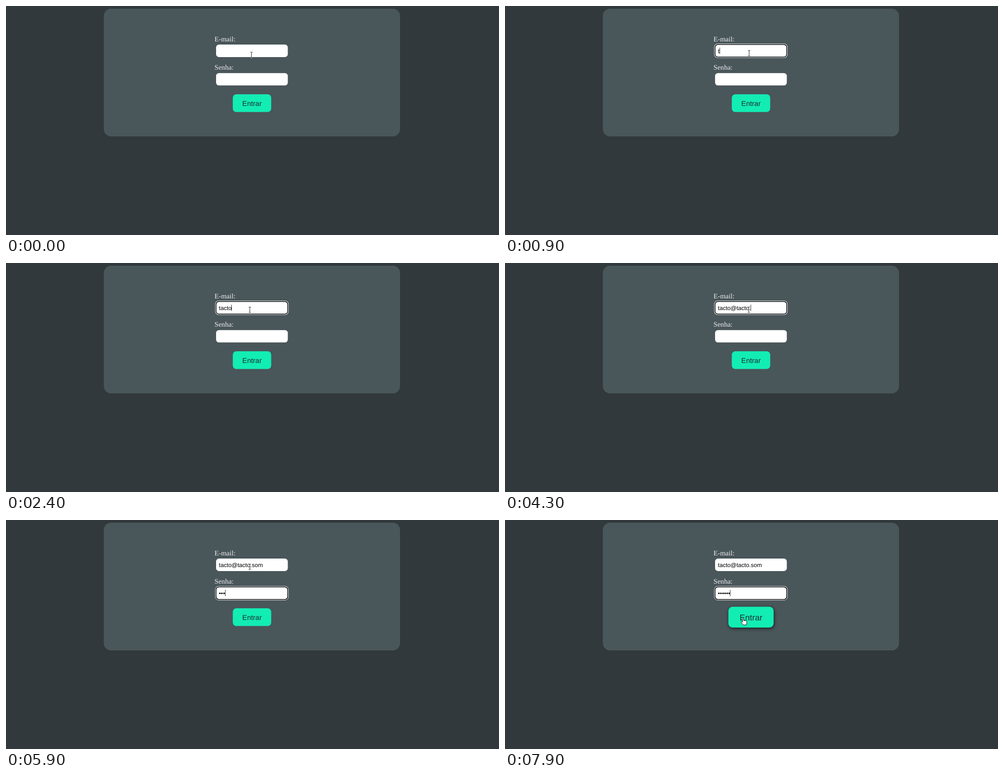
Animation, 1096 px wide and 511 px high, one loop 8000 ms. Source, as an HTML page:

```html
<!DOCTYPE html>
<html lang="pt">
<head>
<meta charset="utf-8">
<title>Login</title>
<style>
  html, body { margin: 0; width: 100%; height: 100%; overflow: hidden; background: #31393c; }
  svg { display: block; }
  text { white-space: pre; text-rendering: geometricPrecision; }
  .label { font: 15.6px "Liberation Serif", serif; fill: #eee; }
  .value { font: 13px "Liberation Sans", sans-serif; fill: #000; }
  .action { font: 15.8px "Liberation Sans", sans-serif; fill: #1d2d30; text-anchor: middle; }
  #menu text { font: 600 12.8px "Open Sans", sans-serif; fill: #1c1c1e; }
  .field { fill: #fff; }
</style>
</head>
<body>
<svg width="1096" height="511" viewBox="0 0 1096 511">
  <rect x="217.5" y="6" width="658.5" height="285" rx="16" fill="#49565a"/>
  <text class="label" x="463.5" y="79">E-mail:</text>
  <text class="label" x="463.5" y="142.3">Senha:</text>
  <rect class="field" x="467" y="86" width="159.5" height="28" rx="6.5"/>
  <rect class="field" x="467" y="149.7" width="159.5" height="27.6" rx="6.5"/>
  <g id="ring">
    <rect x="465" y="84" width="163.2" height="31.8" rx="8" fill="#fff"/>
    <rect x="466" y="85" width="161.2" height="29.8" rx="7" fill="#101314"/>
    <rect x="467.8" y="86.8" width="157.6" height="26.2" rx="5.5" fill="#fff"/>
  </g>
  <text class="value" id="email" x="473.3" y="104.7"></text>
  <text class="value" id="password" x="473.3" y="167.9"></text>
  <rect id="caret" width="1" height="14" fill="#222"/>
  <g id="button">
    <rect x="504" y="197" width="85.4" height="39.6" rx="8" fill="#12edb3"/>
    <text class="action" x="546.7" y="222.5">Entrar</text>
  </g>
  <g id="menu">
    <rect x="466" y="115.3" width="203" height="128.4" rx="3" fill="#fff"/>
    <text x="476" y="140.7">lavinorb@trelo.som</text>
    <text x="476" y="169.7">noticias@tolira.vida</text>
    <text x="476" y="198.7">lavinorb</text>
    <text x="476" y="227.7">Lavino Brinteles Terfinvalis</text>
  </g>
  <g id="pointer">
    <g id="beam" fill="none">
      <path d="M-2.5-6H2.5M0-6V6M-2.5 6H2.5" stroke="#fff" stroke-width="2.4" opacity=".6"/>
      <path d="M-2.5-6H-.7L0-5.4L.7-6H2.5M0-5.4V5.4M-2.5 6H-.7L0 5.4L.7 6H2.5" stroke="#111"/>
    </g>
    <path id="arrow" d="M0 0V13L3.1 10.2L5.6 15.4L7.8 14.4L5.4 9.4H9.3Z" fill="#111" stroke="#fff" stroke-linejoin="round"/>
    <path id="hand" d="M-1.5 9V1.4Q-1.4.2-.2.2Q1 .2 1.1 1.4V5Q2.6 4.2 3.6 5.3Q5 4.7 5.9 5.8Q7.8 5.4 8 7.2V10.5L6.6 14.6H.4L-4.8 9.4Q-4.9 7.5-3.2 7.8Z" fill="#fff" stroke="#111" stroke-linejoin="round"/>
  </g>
</svg>
<script>
const LOOP = 8000, STEP = 100, KEY_GAP = 50, BLINK = 510;
const FOCUS = 600, TAB = 5000, HOVER = 7600;
const [ring, email, password, caret, button, menu, pointer, beam, arrow, hand] =
  ["ring", "email", "password", "caret", "button", "menu", "pointer", "beam", "arrow", "hand"]
    .map(id => document.getElementById(id));

// Bursts of keys by start time; "<" is backspace
const emailKeys = { 880: "tar", 1900: "<", 2000: "ct", 2300: "<to", 3200: "@", 3700: "tac", 4200: "to.", 4700: "som" };
const passwordKeys = { 5600: "••", 5900: "•", 6100: "••", 6380: "•" };

// Straight mouse moves: start, end, target x, target y
const home = [545.7, 109];
const moves = [[500, 1000, 542, 104.3], [6800, 7100, 532, 297], [7100, 7300, 530.5, 249], [7300, 7800, 529.6, 219.5]];

const progress = (t, from, to) => Math.min(1, Math.max(0, (t - from) / (to - from)));
const show = (node, visible) => node.setAttribute("visibility", visible ? "visible" : "hidden");

function type(bursts, t, focusTime) {
  let text = "", last = focusTime;
  for (const [start, keys] of Object.entries(bursts))
    [...keys].forEach((key, i) => {
      const time = +start + i * KEY_GAP;
      if (time > t) return;
      text = key === "<" ? text.slice(0, -1) : text + key;
      last = time;
    });
  return { text, last };
}

function drawFields(t) {
  const mail = type(emailKeys, t, FOCUS), secret = type(passwordKeys, t, TAB);
  email.textContent = mail.text;
  password.textContent = secret.text;

  const second = t >= TAB;
  const node = second ? password : email, { text, last } = second ? secret : mail;
  show(ring, t >= FOCUS);
  ring.setAttribute("transform", `translate(0 ${second ? 63.4 : 0})`);
  show(menu, t >= FOCUS && !mail.text);

  show(caret, t >= FOCUS && Math.floor((t - last) / BLINK) % 2 === 0);
  caret.setAttribute("x", Math.round(473 + (text && node.getComputedTextLength())));
  caret.setAttribute("y", second ? 156 : 93);
}

function drawButton(t) {
  const grow = 1 - (1 - progress(t, HOVER, HOVER + 300)) ** 2;
  button.setAttribute("transform",
    `translate(546.9 216.8) scale(${1 + 0.178 * grow}) translate(-546.7 -216.8)`);
  button.style.filter = grow ? `drop-shadow(1.2px 2.5px 3px rgba(0,0,0,${0.65 * grow}))` : "none";
}

function drawPointer(t) {
  let [x, y] = home;
  for (const [from, to, toX, toY] of moves) {
    const p = progress(t, from, to);
    x += (toX - x) * p;
    y += (toY - y) * p;
  }
  pointer.setAttribute("transform", `translate(${x} ${y})`);
  const overField = y < 115 || (y > 149 && y < 178), overButton = y > 197 && y < 237;
  show(beam, overField);
  show(hand, overButton);
  show(arrow, !overField && !overButton);
}

const start = performance.now();
function tick() {
  const elapsed = (performance.now() - start) % LOOP;
  const t = Math.floor(elapsed / STEP) * STEP;
  drawFields(t);
  drawButton(t);
  drawPointer(t);
  requestAnimationFrame(tick);
}
tick();
</script>
</body>
</html>
```
